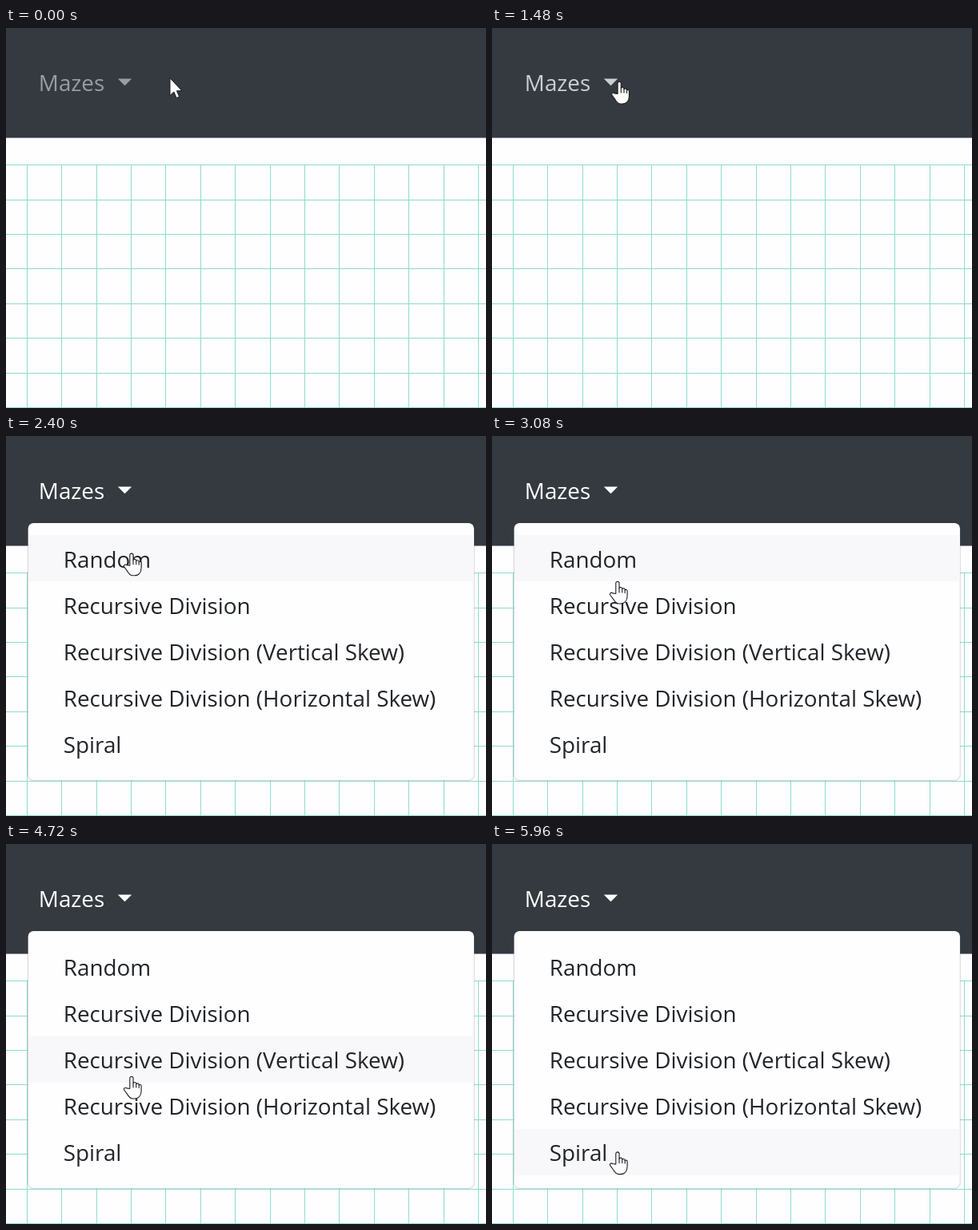
An HTML page for the animation above (7 s loop, 600 by 476 pixels).

```html
<!DOCTYPE html>
<html lang="en">
<head>
<meta charset="utf-8">
<title>Mazes menu</title>
<style>
  html, body { margin: 0; width: 100%; height: 100%; overflow: hidden; background: #fefdff; }
  svg { display: block; width: 600px; height: 476px; }
  text { font: 27.8px "Open Sans", "Noto Sans", sans-serif; white-space: pre; }
</style>
</head>
<body>
<svg viewBox="0 0 600 476">
  <rect width="600" height="476" fill="#fefdff"/>
  <path id="grid" fill="none" stroke="#8edcc5"/>
  <rect width="600" height="137.6" fill="#353a41"/>
  <g id="link">
    <text x="40.8" y="79.2">Mazes</text>
    <path d="M139.8 63.4H157.2L148.5 72.2Z"/>
  </g>
  <g id="menu">
    <rect x="27.5" y="108.9" width="557.6" height="322.3" rx="7" fill="#fefdff" stroke="#000" stroke-opacity=".15" stroke-width="1.4"/>
    <rect x="28" y="109.4" width="556.6" height="321.3" rx="6.5" fill="#fefdff"/>
    <rect id="highlight" x="28" width="556.6" height="58.2" fill="#f8f7fa"/>
    <g id="items" fill="#212529"></g>
  </g>
  <g id="cursor" fill="#fff" stroke="#1c1e21" stroke-linejoin="round" stroke-linecap="round">
    <path id="arrow" d="M0 0V21.5L4.9 17L8.2 24.6L11.6 23.1L8.4 15.7H14.6Z"/>
    <g id="hand" stroke-width="1.1">
      <path d="M-2.4 15.5V2.4a2.1 2.1 0 0 1 4.2 0V8.6c.6-1.6 3.7-1.4 3.7 .6v.6c.7-1.4 3.5-1.2 3.5 .7v.6c.7-1.2 2.9-.7 2.9 1.2V18c0 6-3 10-8.4 10H1.4c-3.8 0-5.3-2.6-7-5.6L-9.4 17.3c-1.4-2.2 1.1-4 3-2.4Z"/>
      <path fill="none" d="M1.8 8.6V14M5.5 9.8V14M9 11V14.5"/>
    </g>
  </g>
</svg>
<script>
const LOOP = 7000, STEP = 40, OPEN_AT = 1520;
const ROW_TOP = 124, ROW_HEIGHT = 58.25;
const LABELS = ["Random", "Recursive Division", "Recursive Division (Vertical Skew)",
  "Recursive Division (Horizontal Skew)", "Spiral"];
// start, end, target x, target y, easing power
const MOVES = [
  [680, 1120, 159.5, 67, 1],
  [1640, 2400, 157.2, 146.8, 1.3],
  [2760, 3360, 157.2, 210.7, 1],
  [3720, 4400, 157.2, 272, 1],
  [4600, 5120, 157.2, 329, .55],
  [5400, 5960, 157.2, 385.6, 1]
];
const el = id => document.getElementById(id);
const show = (id, on) => el(id).setAttribute("display", on ? "inline" : "none");

let lines = "";
for (let i = 0; i < 14; i++) lines += `M${Math.floor(26.2 + 43.4 * i) + .5} 171V476`;
for (let i = 0; i < 8; i++) lines += `M0 ${Math.floor(171.6 + 43.4 * i) + .5}H600`;
el("grid").setAttribute("d", lines);
el("items").innerHTML = LABELS.map((label, i) =>
  `<text x="71.8" y="${165 + 58 * i}">${label}</text>`).join("");

function pointer(t) {
  let x = 205, y = 63;
  for (const [start, end, toX, toY, power] of MOVES) {
    const u = Math.min(1, Math.max(0, (t - start) / (end - start)));
    const k = (u * u * (3 - 2 * u)) ** power;
    x += (toX - x) * k;
    y += (toY - y) * k;
  }
  return { x, y };
}

function draw(t) {
  const { x, y } = pointer(t);
  const open = t >= OPEN_AT, hover = x < 172;
  const row = Math.floor((y - ROW_TOP) / ROW_HEIGHT);
  el("link").setAttribute("fill", open ? "#fff" : hover ? "#ccced0" : "#9a9c9f");
  show("menu", open);
  show("highlight", row >= 0);
  el("highlight").setAttribute("y", ROW_TOP + row * ROW_HEIGHT);
  show("arrow", !hover);
  show("hand", hover);
  el("cursor").setAttribute("transform", `translate(${x} ${y})`);
}

const began = performance.now();
function tick() {
  const t = (performance.now() - began) % LOOP;
  draw(Math.floor(t / STEP) * STEP);
  requestAnimationFrame(tick);
}
tick();
</script>
</body>
</html>
```
